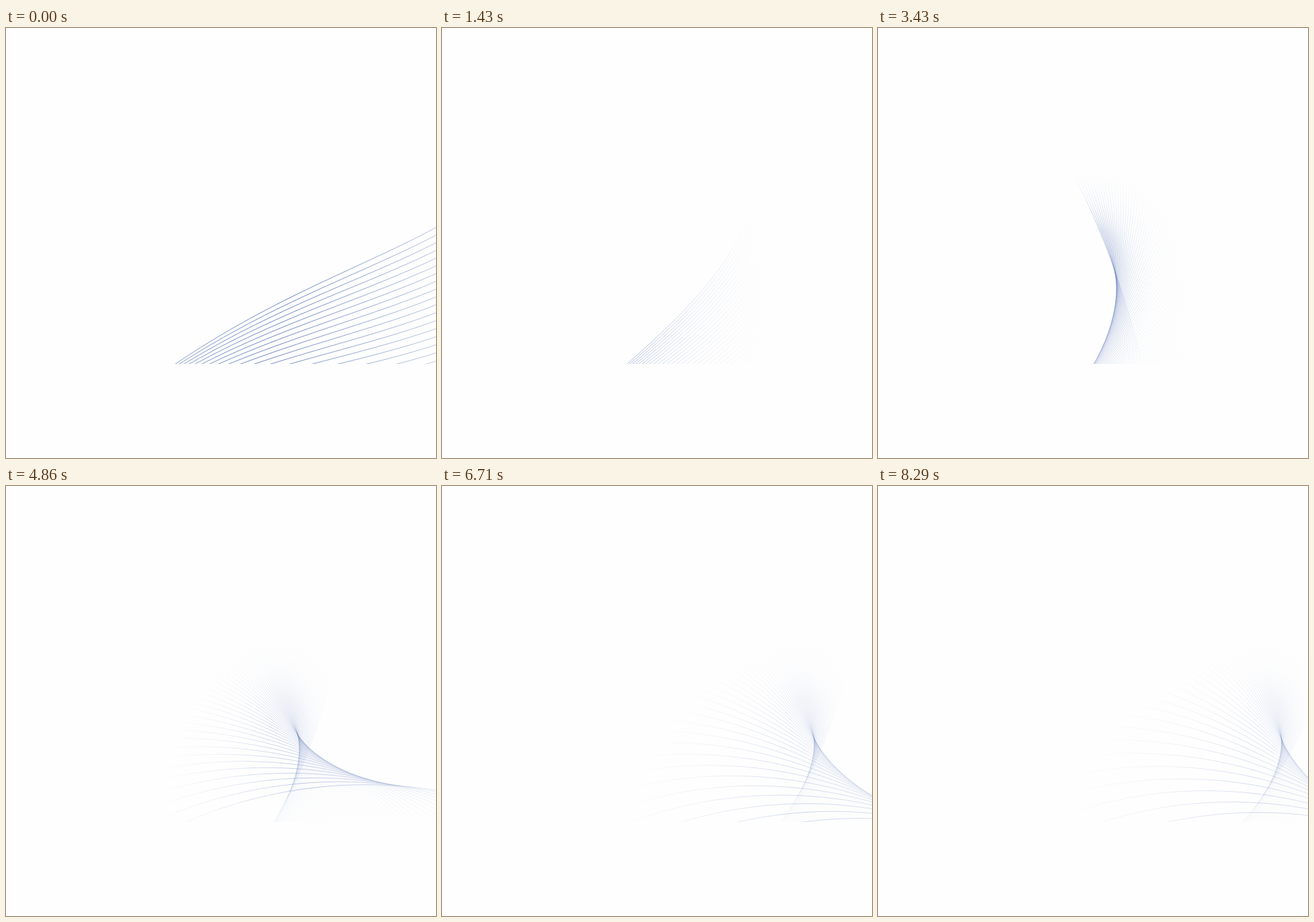
Animation of 640x640 px, one loop 8.43 s. Source, as an HTML page with a canvas:

```html
<!DOCTYPE html>
<html lang="en">
<head>
<meta charset="utf-8">
<title>Line fan</title>
<style>
  html, body { margin: 0; width: 100%; height: 100%; overflow: hidden; background: #fefefe; }
  canvas { display: block; }
</style>
</head>
<body>
<canvas id="stage" width="640" height="640"></canvas>
<script>
const ctx = document.getElementById('stage').getContext('2d');
const LOOP = 8.43, LINES = 64, FLOOR = 500, FORWARD = 160, STEP = 12;
const RAD = Math.PI / 180;

function smooth(from, to, t) {
  const u = Math.min(1, Math.max(0, (t - from) / (to - from)));
  return u * u * (3 - 2 * u);
}

// Each line touches an envelope of two branches that meet in a cusp.
// The fan shrinks, folds around the cusp, then drifts to the right.
function poseAt(t) {
  const shrink = Math.exp(-2 * t);
  const fold = smooth(0, 4.2, t);
  const turn = 1 / (1 + Math.exp((3.45 - t) / .5));
  const drift = smooth(2.2, 8.3, t);
  return {
    x: 320 + 280 * drift,
    y: 234 + 130 * fold + 10 * drift,
    cusp: 75 - 15 * fold + 16 * drift,
    right: 200 + 330 * drift,
    lower: 657 - 380 * fold,
    first: 142 - 146 * turn + 18 * drift ** 3,
    gap: .78 + 1.4 * fold * fold,
    loss: .006 * fold,
    tip: 150 + 550 * shrink,
    grow: .95 + .75 * drift,
    bend: 9 * turn,
    square: 175 * shrink,
    cube: 207 * shrink + 36 * (1 - fold),
    alpha: .38 + .37 * shrink - .14 * drift,
    decay: .025 * fold
  };
}

function drawLine(i, pose) {
  const heading = pose.first + pose.gap * i - pose.loss * i * i;
  const h = heading * RAD, hc = pose.cusp * RAD, d = h - hc;
  const size = d < 0 ? pose.right : pose.lower;
  const arc = size * d * d / 2;
  const back = pose.tip + arc * (d < 0 ? pose.grow : .7);

  // Point of contact with the envelope
  const tx = pose.x + size * (d * Math.sin(h) + Math.cos(h) - Math.cos(hc));
  const ty = pose.y + size * (Math.sin(h) - d * Math.cos(h) - Math.sin(hc));

  const trace = (length, dir) => {
    const count = Math.ceil(length / STEP), step = length / count;
    const points = [];
    let x = tx, y = ty;
    for (let n = 0; n < count; n++) {
      const s = (n + .5) * step, r = dir < 0 ? s / back : 0;
      const angle = heading + dir * pose.bend * s / 100 + pose.square * r * r - pose.cube * r ** 3;
      x += dir * step * Math.cos(angle * RAD);
      y += dir * step * Math.sin(angle * RAD);
      points.push([x, y]);
    }
    return points;
  };

  const points = [...trace(back, -1).reverse(), [tx, ty], ...trace(FORWARD, 1)];
  const contact = back / (back + FORWARD);
  const peak = pose.alpha * Math.exp(-pose.decay * i);
  const ink = ctx.createLinearGradient(...points[0], ...points[points.length - 1]);
  const stop = (at, a) => ink.addColorStop(at, `rgba(58,92,172,${a})`);
  stop(0, 0);
  stop(contact * .3, peak * .35);
  stop(contact * .6, peak);
  stop(contact, peak * .55);
  stop(1, 0);

  ctx.strokeStyle = ink;
  ctx.beginPath();
  points.forEach(p => ctx.lineTo(...p));
  ctx.stroke();
}

function draw(t) {
  const pose = poseAt(t);
  ctx.clearRect(0, 0, 640, 640);
  ctx.save();
  ctx.beginPath();
  ctx.rect(0, 0, 640, FLOOR);
  ctx.clip();
  for (let i = 0; i < LINES; i++) drawLine(i, pose);
  ctx.restore();
}

const began = performance.now();
function tick() {
  draw((performance.now() - began) / 1000 % LOOP);
  requestAnimationFrame(tick);
}
tick();
</script>
</body>
</html>
```
